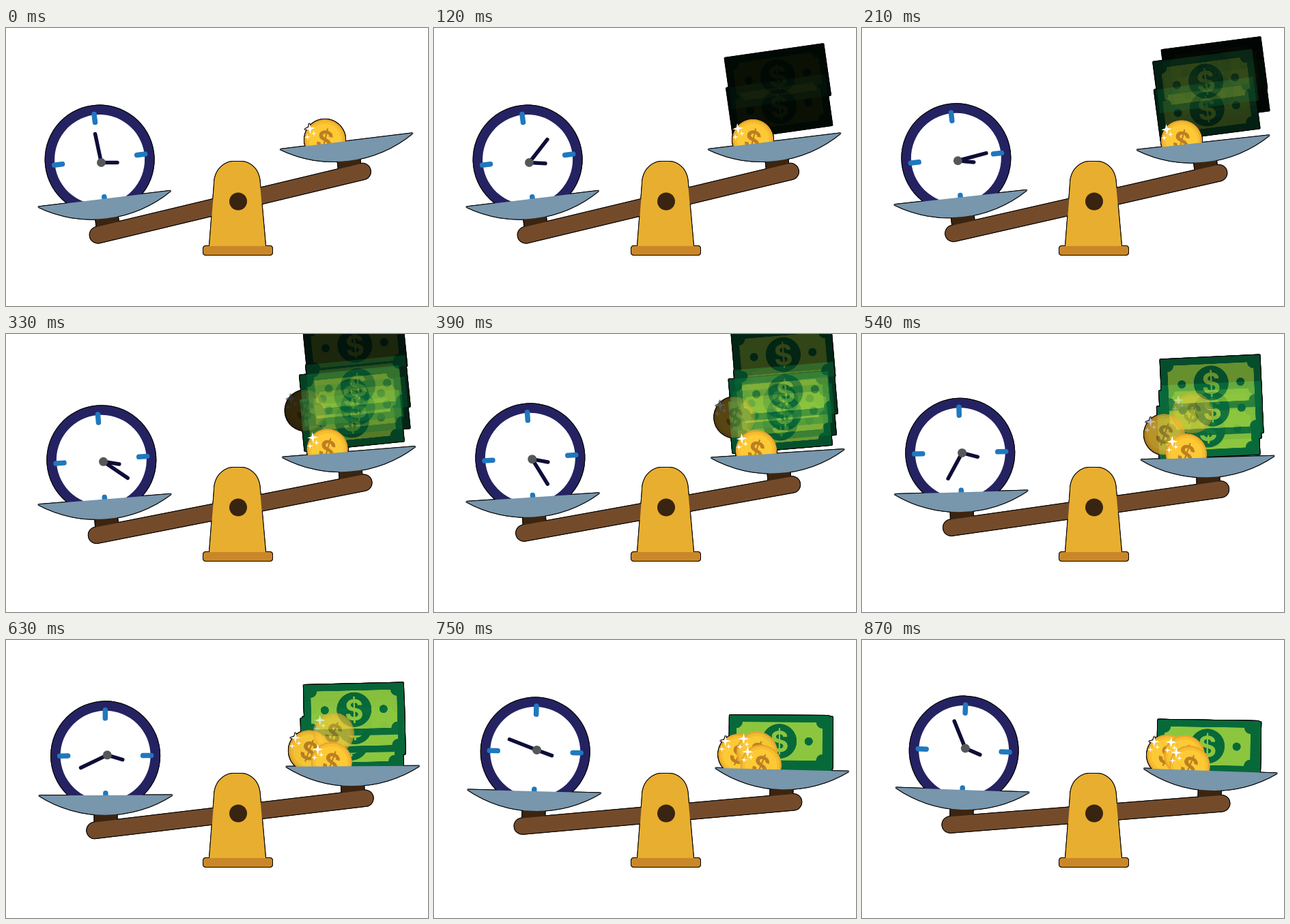
An HTML page with a canvas for the animation above (900 ms loop, 618x408 px).

```html
<!DOCTYPE html>
<html lang="en">
<head>
<meta charset="utf-8">
<title>Time and money on a scale</title>
<style>
html, body { margin: 0; width: 100%; height: 100%; overflow: hidden; background: #fff; }
canvas { display: block; }
</style>
</head>
<body>
<canvas id="stage" width="618" height="408"></canvas>
<script>
const W = 618, H = 408, LOOP = 900, STEP = 30, FADE = 390, TAU = Math.PI * 2;
const PIVOT = { x: 340, y: 254 };
const COIN_R = 30, BILL_W = 146, BILL_H = 76, BILL_TILT = -0.02;

function layer(w, h) {
  const canvas = document.createElement('canvas');
  canvas.width = w;
  canvas.height = h;
  return canvas.getContext('2d');
}

const stage = document.getElementById('stage').getContext('2d');
const ctx = layer(W, H), shadow = layer(W, H);

// Falling pieces: start time, duration, start and end position on the tilting group
const bills = [
  { at: 90, dur: 600, from: [522, 136], to: [507, 152] },
  { at: 90, dur: 700, from: [525, 91], to: [507, 151] },
  { at: 195, dur: 390, from: [537, 113], to: [506, 152] },
  { at: 195, dur: 560, from: [537, 80], to: [504, 150] },
  { at: 255, dur: 510, from: [534, 20], to: [502, 150] }
];
const coins = [
  { at: 255, dur: 390, from: [451, 110], to: [444, 165], even: true },
  { at: 375, dur: 395, from: [501, 87], to: [469, 165], even: true },
  { at: -900, dur: 1, from: [477, 180], to: [477, 180] }
];

const clamp = v => Math.max(0, Math.min(1, v));
const mix = (a, b, u) => a + (b - a) * u;

function disc(c, x, y, r, fill) {
  c.beginPath();
  c.arc(x, y, r, 0, TAU);
  c.fillStyle = fill;
  c.fill();
}

function line(x1, y1, x2, y2, width, color) {
  ctx.beginPath();
  ctx.moveTo(x1, y1);
  ctx.lineTo(x2, y2);
  ctx.lineCap = 'round';
  ctx.lineWidth = width;
  ctx.strokeStyle = color;
  ctx.stroke();
}

function fillPath(path, color) {
  ctx.fillStyle = color;
  ctx.fill(path);
}

function dollar(c, size, color) {
  c.font = `700 ${size}px Inter, sans-serif`;
  c.textAlign = 'center';
  c.fillStyle = color;
  c.fillText('$', 0, size * 0.365);
}

function star(c, x, y, r) {
  c.beginPath();
  c.moveTo(x, y - r);
  for (let i = 1; i <= 4; i++) {
    const a = i * TAU / 4 - TAU / 4, m = a - TAU / 8;
    c.lineTo(x + Math.cos(m) * r * 0.3, y + Math.sin(m) * r * 0.3);
    c.lineTo(x + Math.cos(a) * r, y + Math.sin(a) * r);
  }
  c.fillStyle = '#fff';
  c.fill();
}

// Pre-rendered at double size so that a whole piece fades as one
function sprite(w, h, draw) {
  const c = layer(w * 2, h * 2);
  c.setTransform(2, 0, 0, 2, w, h);
  draw(c);
  return { image: c.canvas, w, h };
}

const billSprite = sprite(BILL_W, BILL_H, c => {
  const dark = '#07693a', light = '#8cc63f';
  c.fillStyle = dark;
  c.fillRect(-73, -38, 146, 76);
  c.fillStyle = light;
  c.fillRect(-63, -28, 126, 56);
  for (const side of [-1, 1]) {
    disc(c, side * 63, -28, 9, dark);
    disc(c, side * 63, 28, 9, dark);
    disc(c, side * 43, 0, 6, dark);
  }
  disc(c, 0, 0, 25.5, dark);
  dollar(c, 42, light);
});

const coinSprite = sprite(64, 64, c => {
  disc(c, 0, 0, COIN_R, '#e9a62b');
  disc(c, 0, 0, 27.5, '#f6bd30');
  disc(c, 0, 0, 23.5, '#fdca36');
  c.save();
  c.rotate(0.36);
  dollar(c, 37, '#bd7f22');
  c.restore();
  star(c, -20, -19, 8);
  star(c, -15, -11, 4);
  star(c, -25, -7, 4.5);
});

const stand = new Path2D('M298 320L305 229C305 208 320 196 333 196H344C358 196 372 208 372 229L380 320Z');
const base = new Path2D();
base.roundRect(289, 320, 101, 13, 4);

function pan(x, y) {
  ctx.fillStyle = '#3b2511';
  ctx.fillRect(x - 16.5, y + 24, 33, 18);
  fillPath(new Path2D(`M${x - 98} ${y}A181 181 0 0 0 ${x + 98} ${y}Z`), '#7896ac');
}

function place(piece, t) {
  const u = clamp((t - piece.at) / piece.dur);
  const fall = piece.even ? u : (u + u * u) / 2;
  return {
    x: mix(piece.from[0], piece.to[0], u),
    y: mix(piece.from[1], piece.to[1], fall),
    alpha: clamp((t - piece.at) / FADE)
  };
}

function drawSprite(s, p, tilt) {
  ctx.save();
  ctx.globalAlpha = p.alpha;
  ctx.translate(p.x, p.y);
  ctx.rotate(tilt);
  ctx.drawImage(s.image, -s.w / 2, -s.h / 2, s.w, s.h);
  ctx.restore();
}

function drawMoney(t) {
  const live = list => list.filter(p => t >= p.at).map(p => place(p, t));
  const notes = live(bills), discs = live(coins);
  // Pieces fade up from black silhouettes
  for (const p of notes) {
    ctx.save();
    ctx.translate(p.x, p.y);
    ctx.rotate(BILL_TILT);
    ctx.fillStyle = '#000';
    ctx.fillRect(-BILL_W / 2, -BILL_H / 2, BILL_W, BILL_H);
    ctx.restore();
  }
  for (const p of discs) disc(ctx, p.x, p.y, COIN_R, '#000');
  for (const p of notes) drawSprite(billSprite, p, BILL_TILT);
  for (const p of discs) drawSprite(coinSprite, p, 0);
}

function drawClock() {
  const x = 146, y = 169;
  disc(ctx, x, y, 79.5, '#252262');
  disc(ctx, x, y, 66, '#fff');
  for (let i = 0; i < 4; i++) {
    const dx = Math.cos(i * TAU / 4), dy = Math.sin(i * TAU / 4);
    line(x + dx * 55, y + dy * 55, x + dx * 67, y + dy * 67, 7.5, '#2078be');
  }
}

function drawHands(t, swing) {
  const x = mix(139.5, 151.3, swing), y = mix(197.5, 159, swing);
  const hand = (degrees, length) => {
    const a = degrees * TAU / 360;
    line(x, y, x + Math.sin(a) * length, y - Math.cos(a) * length, 5.5, '#0e0d38');
  };
  hand(90 + 0.027 * t, 23.5);
  hand(-12 + 0.418 * t - 0.000018 * t * t, 43);
  disc(ctx, x, y, 6.5, '#565759');
}

function tilted(angle, draw) {
  ctx.save();
  ctx.translate(PIVOT.x, PIVOT.y);
  ctx.rotate(angle);
  ctx.translate(-PIVOT.x, -PIVOT.y);
  draw();
  ctx.restore();
}

function drawScene(t) {
  const swing = clamp((t - 165) / 625);
  const angle = (-6.95 + 9 * swing) * TAU / 360;
  ctx.clearRect(0, 0, W, H);
  tilted(angle, drawClock);
  drawHands(t, swing);
  tilted(angle, () => {
    drawMoney(t);
    pan(146, 227);
    pan(508, 186);
    line(130, 278.5, 526, 233, 23.5, '#744b2a');
  });
  fillPath(stand, '#e8ae2f');
  fillPath(base, '#c98729');
  disc(ctx, 340, 254.5, 13, '#392411');
}

// The dark outline follows only the outer edge of the whole scene
function render(t) {
  drawScene(t);
  shadow.globalCompositeOperation = 'copy';
  shadow.drawImage(ctx.canvas, 0, 0);
  shadow.globalCompositeOperation = 'source-in';
  shadow.fillRect(0, 0, W, H);
  stage.fillStyle = '#fff';
  stage.fillRect(0, 0, W, H);
  for (let i = 0; i < 8; i++) {
    const a = i * TAU / 8;
    stage.drawImage(shadow.canvas, Math.cos(a), Math.sin(a));
  }
  stage.drawImage(ctx.canvas, 0, 0);
}

const start = performance.now();
function tick() {
  const t = (performance.now() - start) % LOOP;
  render(Math.floor(t / STEP) * STEP);
  requestAnimationFrame(tick);
}
tick();
</script>
</body>
</html>
```
